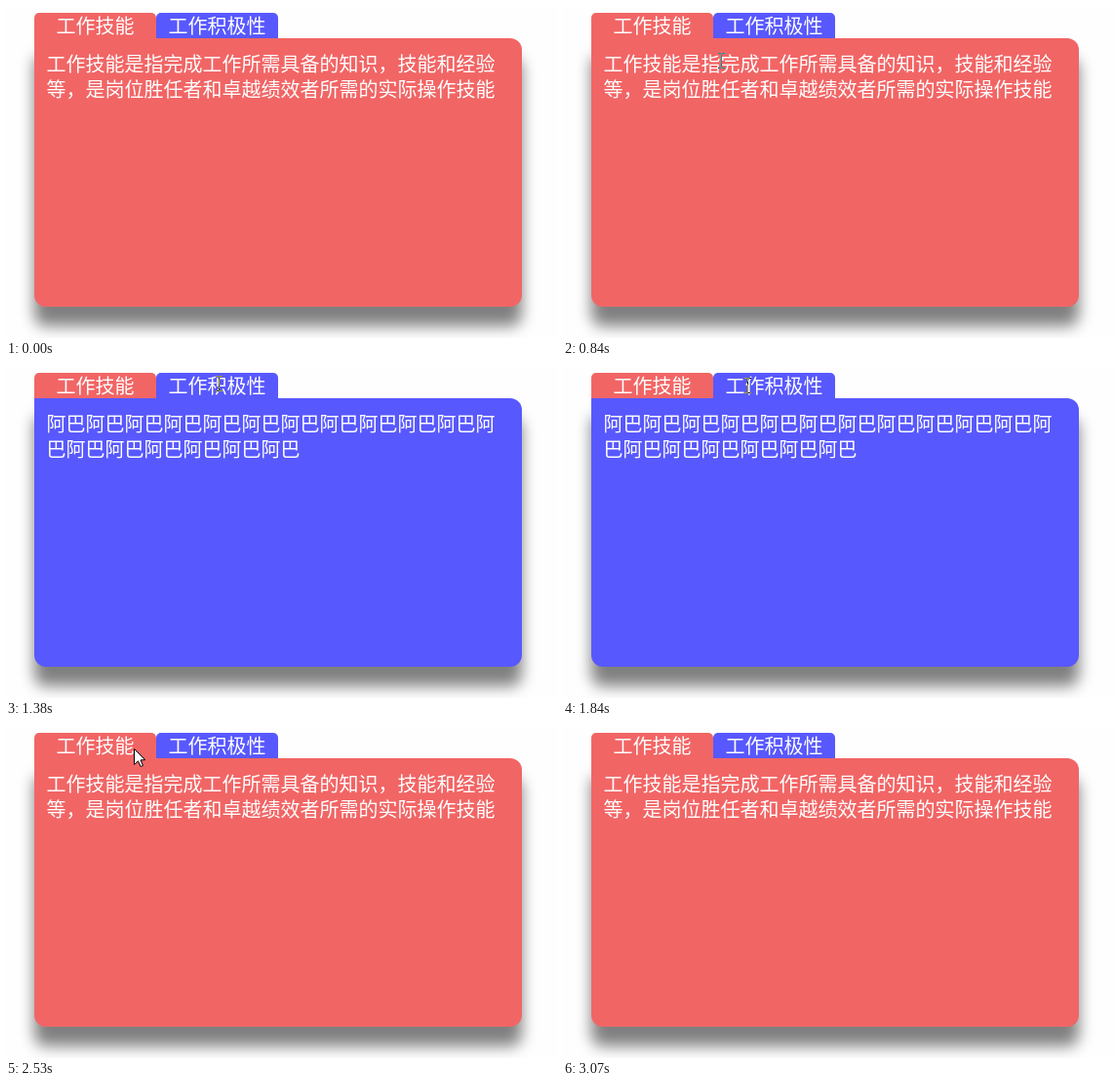
Write an HTML page with a canvas that moves like this. It is 565 px wide and 340 px high and loops after 3.62 s.

```html
<!DOCTYPE html>
<html lang="zh-CN">
<head>
<meta charset="utf-8">
<title>标签切换</title>
<style>
html, body { margin: 0; width: 100%; height: 100%; overflow: hidden; background: #fefefe; }
canvas { display: block; }
</style>
</head>
<body>
<canvas id="stage" width="565" height="340"></canvas>
<script>
const ctx = document.getElementById('stage').getContext('2d');
const LOOP = 3620, TICK = 76.88;
const RED = '#f26565', BLUE = '#5858ff', SIZE = 20, LINE = 26;

const chant = '阿巴'.repeat(18);
const pages = {
  skill: ['工作技能是指完成工作所需具备的知识，技能和经验', '等，是岗位胜任者和卓越绩效者所需的实际操作技能'],
  drive: [chant.slice(0, 23), chant.slice(23)]
};

// pointer stops, joined by straight moves; pow > 1 starts slowly, pow < 1 ends slowly
const stops = [
  { at: 1, x: 443, y: 322 },
  { at: 5, x: 248, y: 126, pow: 0.9 },
  { at: 9, x: 128, y: 76, pow: 0.6 },
  { at: 14, x: 213, y: 26 },
  { at: 18, x: 218, y: 18, pow: 0.4 },
  { at: 22, x: 218, y: 18 },
  { at: 28, x: 131, y: 23 },
  { at: 33, x: 131, y: 23 },
  { at: 39, x: 473, y: 320, pow: 1.7 }
];

function box(x, y, w, h, radii, color) {
  ctx.fillStyle = color;
  ctx.beginPath();
  ctx.roundRect(x, y, w, h, radii);
  ctx.fill();
}

function pointerAt(tick) {
  const i = stops.findIndex(s => s.at >= tick);
  if (tick < 1 || i < 0) return null;
  const b = stops[i], a = stops[i - 1] || b;
  const u = a === b ? 0 : ((tick - a.at) / (b.at - a.at)) ** (b.pow || 1);
  return { x: Math.round(a.x + (b.x - a.x) * u), y: Math.round(a.y + (b.y - a.y) * u) };
}

function arrow(x, y) {
  ctx.save();
  ctx.translate(x + 0.5, y + 0.5);
  ctx.beginPath();
  for (const [px, py] of [[0, 0], [0, 16], [4, 12.4], [6.6, 18], [9, 17], [6.5, 11.4], [11.2, 11.2]])
    ctx.lineTo(px, py);
  ctx.closePath();
  ctx.fillStyle = '#fff';
  ctx.fill();
  ctx.strokeStyle = '#000';
  ctx.stroke();
  ctx.restore();
}

// text pointer: inverts what lies below
function beam(x, y) {
  ctx.save();
  ctx.globalCompositeOperation = 'difference';
  ctx.fillStyle = '#fff';
  ctx.fillRect(x, y - 7, 1, 14);
  for (const edge of [y - 8, y + 7]) {
    ctx.fillRect(x - 3, edge, 3, 1);
    ctx.fillRect(x + 1, edge, 3, 1);
  }
  ctx.restore();
}

function draw(time) {
  const tick = Math.floor((time + 9.9) / TICK);
  const blue = tick >= 18 && tick < 33;
  const pressed = tick === 16 || tick === 17;

  ctx.fillStyle = '#fefefe';
  ctx.fillRect(0, 0, 565, 340);

  ctx.save();
  ctx.shadowColor = '#808080';
  ctx.shadowBlur = 15;
  ctx.shadowOffsetY = 20;
  box(29, 33, 500, 275, [0, 12, 12, 12], blue ? BLUE : RED);
  ctx.restore();
  box(29, 7, 125, LINE, [5, 5, 0, 0], RED);
  box(154, 7, 125, LINE, [5, 5, 0, 0], BLUE);

  const lines = (blue ? pages.drive : pages.skill).map((text, i) => ({ text, x: 41, y: 46 + LINE * i }));
  const labels = [{ text: '工作技能', x: 51, y: 7 }, { text: '工作积极性', x: 166, y: 7 }, ...lines];
  ctx.font = SIZE + 'px "Noto Sans CJK SC", "Noto Sans CJK", sans-serif';
  ctx.fillStyle = '#fff';
  for (const l of labels) ctx.fillText(l.text, l.x + 0.5, l.y + 21);

  const p = pointerAt(tick);
  if (!p) return;
  if (pressed) {
    ctx.fillStyle = 'rgba(255,255,0,.5)';
    ctx.beginPath();
    ctx.arc(216, 18, 15, 0, Math.PI * 2);
    ctx.fill();
  }
  const onText = labels.some(l =>
    p.x >= l.x && p.x < l.x + SIZE * l.text.length && p.y >= l.y && p.y < l.y + LINE);
  (onText ? beam : arrow)(p.x, p.y);
}

const start = performance.now();
function frame() {
  draw((performance.now() - start) % LOOP);
  requestAnimationFrame(frame);
}
frame();
</script>
</body>
</html>
```
